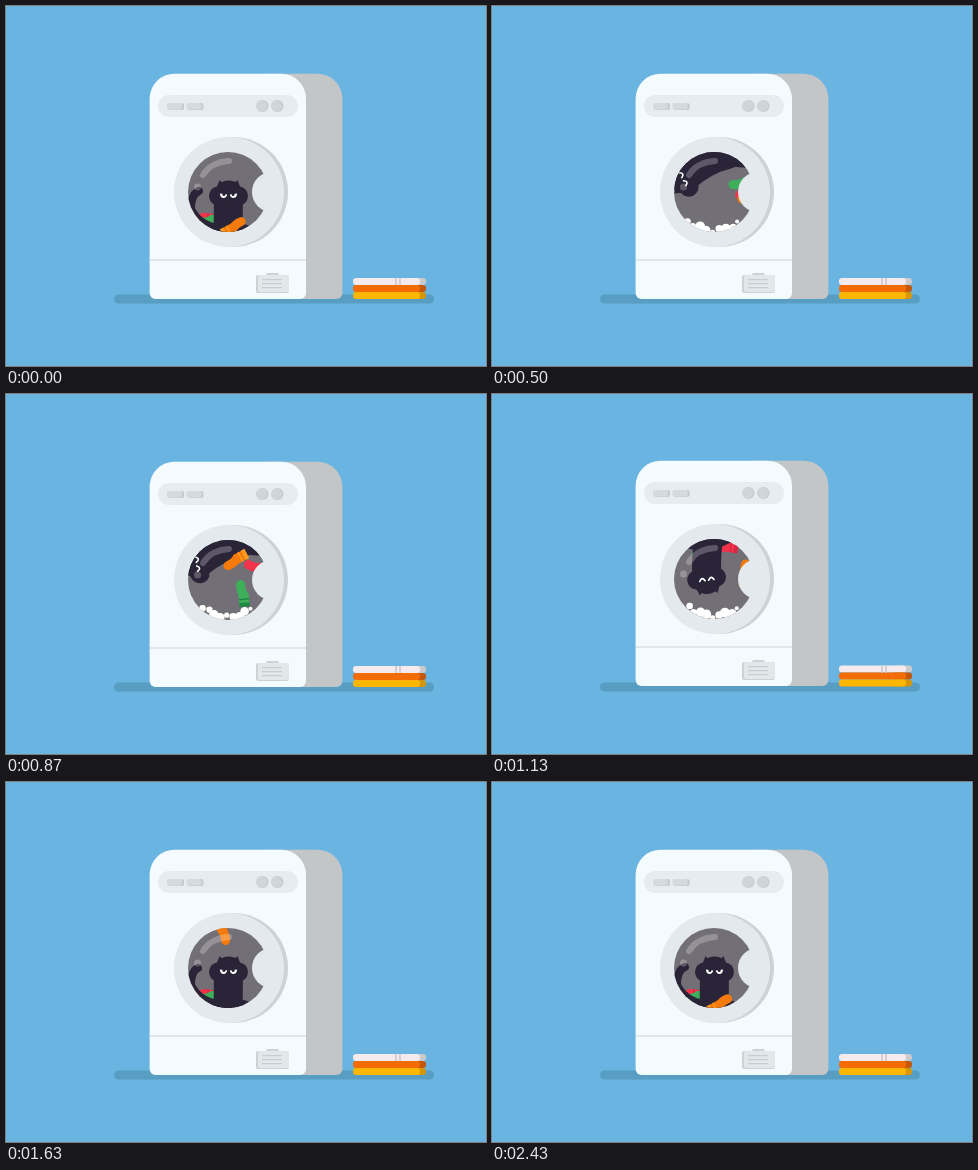
Recreate the animation shown at these times as an HTML page with a canvas. Size 480 px wide and 360 px high, loop 2530 ms.

```html
<!DOCTYPE html>
<html lang="en">
<head>
<meta charset="utf-8">
<title>Cat in a washing machine</title>
<style>
html, body { margin: 0; width: 100%; height: 100%; overflow: hidden; background: #69b4e0; }
canvas { display: block; width: 480px; height: 360px; }
</style>
</head>
<body>
<canvas width="480" height="360"></canvas>
<script>
const ctx = document.querySelector('canvas').getContext('2d');
const LOOP = 2530, SPIN = 1630, CX = 222, CY = 186, GLASS = 40;
const CAT = '#292437', RING = '#e4e9ed';

// start and turn: orbit in degrees; surge: extra orbit at full speed;
// reach and lift: distance from the drum centre; tilt, roll, swing: the sock's own angle
const red = { color: '#f2334c', cuff: '#d92743', start: 136, turn: 720, surge: 180,
  reach: 36, lift: 3, tilt: 15, roll: 0, swing: 20 };
const green = { color: '#3fae5b', cuff: '#1f8a43', start: 122, turn: 720, surge: -110,
  reach: 32, lift: 11, tilt: 5, roll: 0, swing: 90 };
const orange = { color: '#f57a0c', cuff: '#fb9a1f', start: 80, turn: 900, surge: 90,
  reach: 37, lift: 15, tilt: 160, roll: -610, swing: 150 };

const rad = degrees => degrees * Math.PI / 180;
const bell = (t, width) => Math.exp(-(((t - 840) / width) ** 2));

function ramp(from, to, t) {
  const p = Math.min(1, Math.max(0, (t - from) / (to - from)));
  return p * p * (3 - 2 * p);
}

function box(color, x, y, w, h, r = 0) {
  ctx.fillStyle = color;
  ctx.beginPath();
  ctx.roundRect(x, y, w, h, r);
  ctx.fill();
}

function oval(color, x, y, rx, ry = rx) {
  ctx.fillStyle = color;
  ctx.beginPath();
  ctx.ellipse(x, y, rx, ry, 0, 0, 7);
  ctx.fill();
}

function line(color, width, path, cap = 'round') {
  ctx.strokeStyle = color;
  ctx.lineWidth = width;
  ctx.lineCap = cap;
  ctx.lineJoin = 'round';
  ctx.stroke(new Path2D(path));
}

function placed(x, y, degrees, draw) {
  ctx.save();
  ctx.translate(x, y);
  ctx.rotate(rad(degrees));
  draw();
  ctx.restore();
}

function inCircle(x, y, r, draw) {
  ctx.save();
  ctx.beginPath();
  ctx.arc(x, y, r, 0, 7);
  ctx.clip();
  draw();
  ctx.restore();
}

// drop lands a sock on the cat's head, slide takes it down to the floor
function drawSock(sock, t, drop = 0, slide = 0) {
  const p = Math.min(1, t / SPIN), peak = bell(t, 180);
  const angle = rad(sock.start + sock.turn * p + sock.surge * peak);
  const dist = sock.reach - sock.lift * bell(t, 250);
  const x = CX + dist * Math.cos(angle) + 5 * drop + 8 * slide;
  const y = CY + dist * Math.sin(angle) + 24 * drop + 50 * slide;
  const turn = sock.tilt + sock.roll * p + sock.swing * peak - 60 * drop - 50 * slide;
  placed(x, y, turn, () => {
    line(sock.color, 9, 'M-9 4 Q-3 4 2 0');
    line(sock.color, 10, 'M0 1 L12 -1', 'butt');
    line(sock.cuff, 10.5, 'M5 0 L6.5 -.2 M9 -.5 L13 -1', 'butt');
  });
}

function drawFace(happy) {
  for (const side of [-1, 1]) {
    ctx.save();
    ctx.scale(side, 1);
    if (happy) line('#fff', 1.6, 'M1.8 -1 Q4.5 4 7.2 -1');
    else {
      ctx.fillStyle = '#fff';
      ctx.fill(new Path2D('M1.3 -.6 L8.6 -1.6 Q8 3 5 3 Q2 2.8 1.3 -.6'));
      oval(CAT, 4.6, -.4, 1.5);
    }
    ctx.restore();
  }
}

function drawCat(t) {
  // The base sticks to the drum while the head is flung to the left
  const base = 200 * ramp(0, 330, t) - 28 * ramp(870, 1130, t) + 188 * ramp(1130, 1560, t);
  const fling = ramp(60, 330, t) - .75 * ramp(870, 1130, t) - .25 * ramp(1130, 1400, t);
  const bend = ramp(330, 600, t) - ramp(870, 1130, t);
  const hx = CX + .5 - 31 * fling, hy = CY + 3 - 10 * fling - 9 * bend;
  const bx = CX - 40 * Math.sin(rad(base)), by = CY + 40 * Math.cos(rad(base));
  const mx = CX + ((bx + hx) / 2 - CX) * 1.25, my = CY + ((by + hy) / 2 - CY) * 1.25;
  line(CAT, 29, `M${bx} ${by} Q${mx} ${my} ${hx} ${hy}`);
  placed(CX, CY, base, () => {
    oval(CAT, 0, 39, 26, 9);
    const hidden = ramp(0, 120, t) - ramp(1480, 1600, t);
    const curl = 1 - ramp(0, 120, t) + ramp(SPIN, 2130, t);
    ctx.translate(-18 * hidden, 0);
    line(CAT, 8, `M0 38 Q-28 36 -37 17 Q-37 ${3 - curl} ${-30 + curl} ${-curl}`);
  });
  placed(hx, hy, base + 62 * bend, () => {
    oval(CAT, 0, 1, 14, 11);
    oval(CAT, -10.5, 1, 9, 9.5);
    oval(CAT, 10.5, 1, 9, 9.5);
    ctx.fill(new Path2D('M-13 -4 L-9 -15 L-2 -8 H2 L9 -15 L13 -4 Z'));
    drawFace(t > 90 && t < 1480);
  });
}

function drawFoam(t) {
  const amount = ramp(200, 600, t) - ramp(1130, 1480, t);
  for (let i = 0; i < 9; i++) {
    const angle = rad(52 + i * 10);
    const dist = 49 - 12 * amount + 2 * Math.sin(t / 90 + i * 2);
    oval('#fff', CX + dist * Math.cos(angle), CY + dist * Math.sin(angle),
      2 + 3 * Math.abs(Math.sin(i * 2.3)));
  }
}

function drawDoor(t) {
  const shine = 'rgba(255,255,255,.24)';
  oval('#ccd2d6', 227, 186, 55);
  oval(RING, 223, 186, 55);
  inCircle(CX, CY, GLASS, () => {
    box('#727076', 180, 140, 90, 90);
    drawSock(red, t);
    drawSock(green, t);
    drawCat(t);
    drawSock(orange, t, ramp(1900, 2080, t), ramp(2130, 2400, t));
    drawFoam(t);
    line(shine, 6, 'M197 169 Q205 156 223 155');
    oval(shine, 191.5, 181, 3.5);
  });
  inCircle(223, 186, 54.5, () => oval(RING, 266, 186, 20));
}

function drawMachine(t) {
  box('#c2c6c7', 260, 67.7, 76.4, 225.3, [0, 25, 6, 0]);
  box('#f4fbff', 143.6, 67.7, 156.4, 225.3, [25, 25, 6, 6]);
  box('#e7ecf0', 152, 89, 140, 22, 11);
  for (const x of [161, 180.5]) {
    box('#c5cacf', x + 1, 97, 16, 7, 2);
    box('#d5dade', x, 97, 15, 6.5, 2);
  }
  for (const x of [256, 271]) {
    oval('#c6cbcf', x + .5, 100, 6);
    oval('#d0d5d9', x - .5, 100, 5.5);
  }
  box('#e3e7e9', 144, 253, 156, 2);
  box('#cdd2d6', 260, 267, 13, 5, 2);
  box('#cdd2d6', 250, 269, 33, 18, 2);
  box('#e2e7ea', 252, 269, 31, 17, 2);
  for (const y of [273, 277, 281]) box('#c8cdd1', 256, y, 20, 1.3, .6);
  drawDoor(t);
}

function drawTowels() {
  const colors = [['#f5ebee', '#cbcacd'], ['#f36c05', '#c4580c'], ['#fdb703', '#d3960c']];
  colors.forEach(([face, edge], i) => {
    const y = 272 + i * 7;
    box(edge, 400, y, 20, 7, 3);
    box(face, 347, y, 67, 7, 3);
  });
  for (const x of [389, 393]) box('#d1cfd3', x, 272, 2, 7);
}

function draw() {
  const t = performance.now() % LOOP;
  box('#69b4e0', 0, 0, 480, 360);
  box('#589dc2', 108, 288.5, 320, 9, 4.5);
  const jolt = t > 30 && t < 1600 && t % 233 > 184;
  ctx.save();
  ctx.translate(0, jolt ? -1 : 0);
  drawMachine(t);
  ctx.translate(0, jolt ? .5 : 0);
  drawTowels();
  ctx.restore();
  requestAnimationFrame(draw);
}
draw();
</script>
</body>
</html>
```
